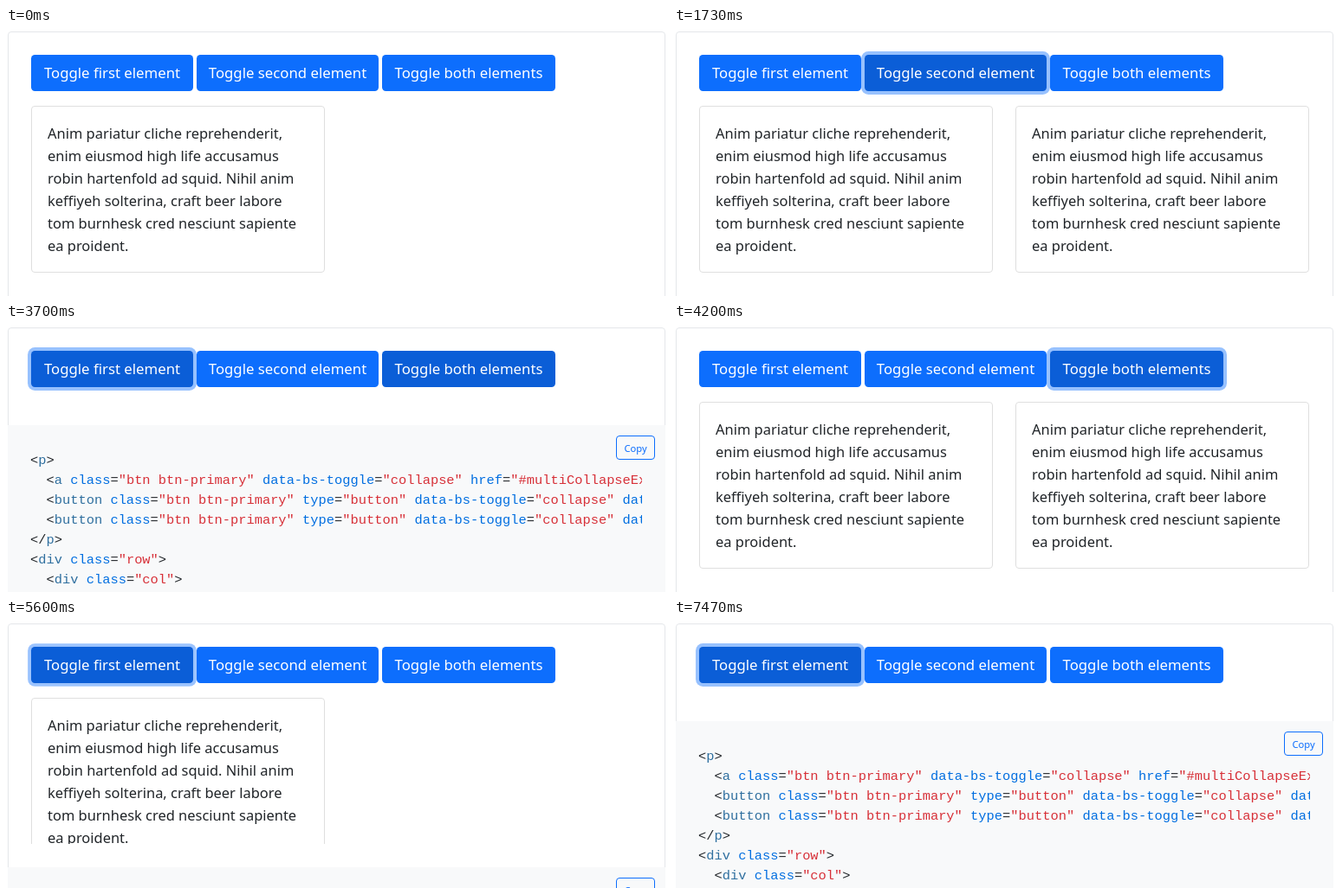
An HTML page that plays this animation: 764 by 310 pixels, repeating every 7510 ms.

```html
<!DOCTYPE html>
<html lang="en">
<head>
<meta charset="utf-8">
<title>Collapse with multiple targets</title>
<style>
* { box-sizing: border-box; }
html, body { margin: 0; width: 100%; height: 100%; overflow: hidden; background: #fff; }
body { position: relative; color: #212529; font: 16.45px/26px "Noto Sans", sans-serif; }
body > *, .copy { position: absolute; }
#frame { left: 2px; top: 4px; width: 759px; border: 1px solid #e4e7ea; border-radius: 4px 4px 0 0; }
.btn { top: 31px; height: 42px; border-radius: 4.4px; color: #fff; font-size: 16.75px; line-height: 42px; text-align: center; white-space: nowrap; }
.fold { top: 90px; width: 339px; overflow: hidden; }
.card { height: 193px; padding: 18px 0 0 18px; border: 1px solid #dfdfdf; border-radius: 4px; white-space: pre; }
#code { left: 2px; width: 759px; height: 200px; background: #f8f9fa; }
pre { position: absolute; left: 26px; top: 30px; width: 706px; margin: 0; overflow: hidden; font: 15.4px/23px "Liberation Mono", monospace; }
.tag { color: #2f6f9f; }
.attr { color: #006ee0; }
.str { color: #d73038; }
.copy { left: 702px; top: 12px; width: 45px; height: 28px; border: 1px solid #0d6efd; border-radius: 4px; color: #0d6efd; font-size: 11.2px; line-height: 28px; text-align: center; }
</style>
</head>
<body>
<div id="frame"></div>
<div class="btn" style="left:29px;width:187px">Toggle first element</div>
<div class="btn" style="left:220px;width:210px">Toggle second element</div>
<div class="btn" style="left:434px;width:200px">Toggle both elements</div>
<div class="fold" style="left:29px"><div class="card"></div></div>
<div class="fold" style="left:394px"><div class="card"></div></div>
<div id="code"><pre></pre><div class="copy">Copy</div></div>
<script>
const LOOP = 7510, CARD = 193, FOLD = 350, FADE = 150;
const all = s => [...document.querySelectorAll(s)];
const frame = document.getElementById('frame'), code = document.getElementById('code');
const buttons = all('.btn'), folds = all('.fold');

for (const card of all('.card')) card.textContent = `Anim pariatur cliche reprehenderit,
enim eiusmod high life accusamus
robin hartenfold ad squid. Nihil anim
keffiyeh solterina, craft beer labore
tom burnhesk cred nesciunt sapiente
ea proident.`;

const source = `<p>
  <a class="btn btn-primary" data-bs-toggle="collapse" href="#multiCollapseExample1" role="button">
  <button class="btn btn-primary" type="button" data-bs-toggle="collapse" data-bs-target="#multiCollapseExample2">
  <button class="btn btn-primary" type="button" data-bs-toggle="collapse" data-bs-target=".multi-collapse">
</p>
<div class="row">
  <div class="col">`;
const span = (kind, text) => `<span class="${kind}">${text}</span>`;
document.querySelector('pre').innerHTML = source.replace(
  /(<\/?)(\w+)|([\w-]+)(?==)|("[^"]*")|>/g,
  (m, open, tag, attr, str) => tag ? open.replace('<', '&lt;') + span('tag', tag)
    : attr ? span('attr', attr) : str ? span('str', str) : '&gt;');

// CSS-style timing curve through (x1, y1) and (x2, y2)
function bezier(x1, y1, x2, y2) {
  const at = (s, a, b) => 3 * s * (1 - s) * ((1 - s) * a + s * b) + s ** 3;
  return x => {
    if (x <= 0) return 0;
    if (x >= 1) return 1;
    let lo = 0, hi = 1;
    for (let i = 0; i < 24; i++) {
      const mid = (lo + hi) / 2;
      if (at(mid, x1, x2) < x) lo = mid; else hi = mid;
    }
    return at(lo, y1, y2);
  };
}
const ease = bezier(.25, .1, .25, 1), easeInOut = bezier(.42, 0, .58, 1);

// Value that flips between 0 and 1 at each listed time
function level(t, flips, span, curve, start = 0) {
  let v = start, sign = start ? -1 : 1;
  for (const at of flips) {
    v += sign * curve((t - at) / span);
    sign = -sign;
  }
  return v;
}

const dark = [[2750, 3760, 5250], [620, 2950, 4550, 5470], [300, 480, 3500, 4720]];
const focus = [[2950, 3760, 5470], [1000, 2950, 4720, 5470], [3760, 4720]];
const toggles = [[3054, 3830, 5560], [1080, 2100, 3830, 4783]];
const base = [13, 110, 253], shade = [11, 94, 215];

function draw() {
  const t = performance.now() % LOOP;
  buttons.forEach((b, i) => {
    const d = level(t, dark[i], FADE, easeInOut);
    const f = level(t, focus[i], FADE, easeInOut);
    b.style.background = `rgb(${base.map((c, k) => Math.round(c + (shade[k] - c) * d))})`;
    b.style.boxShadow = `0 0 0 ${4 * f}px rgba(49,132,253,${.5 * f})`;
  });
  const heights = toggles.map((flips, i) => CARD * level(t, flips, FOLD, ease, i ? 0 : 1));
  folds.forEach((el, i) => el.style.height = heights[i] + 'px');
  const row = Math.max(...heights);
  frame.style.height = 114 + row + 'px';
  code.style.top = 117 + row + 'px';
  requestAnimationFrame(draw);
}
draw();
</script>
</body>
</html>
```
